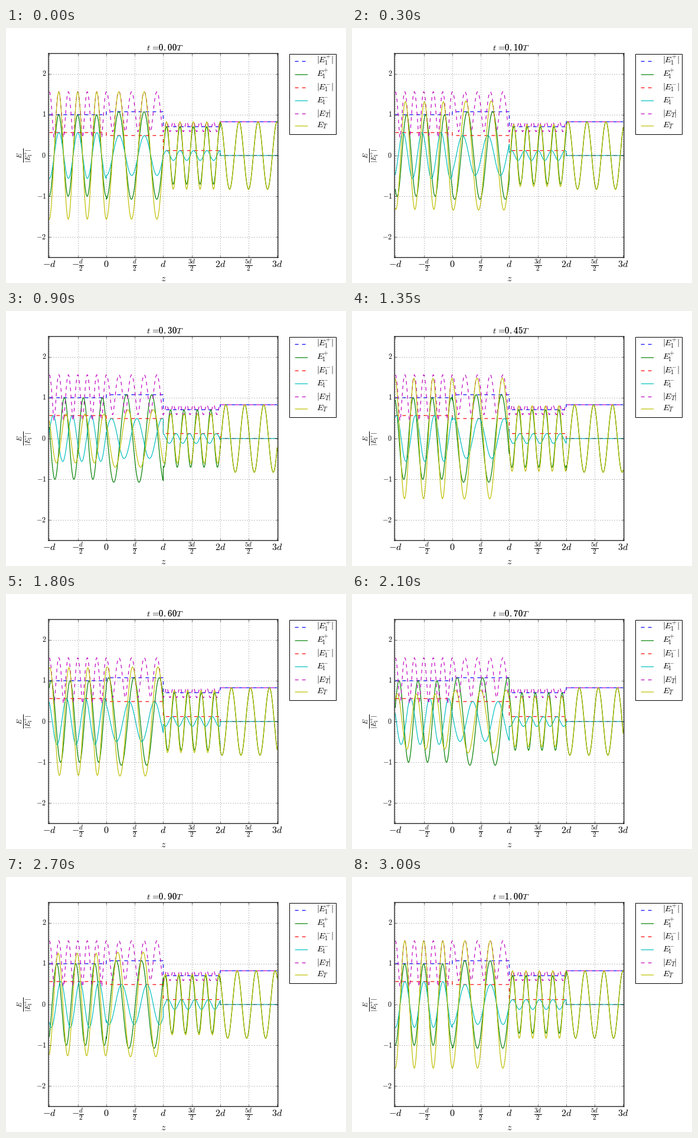
Recreate the animation shown at these times as a matplotlib script. Size 576 by 432 pixels, loop 3.15 s.

```python
import numpy as np
import matplotlib.pyplot as plt
from matplotlib.animation import FuncAnimation

W, H, DPI = 576, 432, 72
STEPS = 21
LAG = 0.006  # constant phase lag, in periods
TAU = 2 * np.pi

plt.rcParams.update({
    "mathtext.fontset": "cm",
    "lines.scale_dashes": False,
    "axes.linewidth": 1.2,
})

# Wave numbers per layer (in cycles per d); d = 1
K0, K1, K2 = 3, 2.25, 4.25


def amplitudes():
    """Solve the boundary conditions back from the last layer, |E1+| = 1."""
    r = (K2 - K0) / (K2 + K0)
    p2, m2 = 1 / (1 + r), r / (1 + r)
    total, diff = K2 / K1, p2 - m2
    p1, m1 = (total + diff) / 2, (total - diff) / 2
    diff *= K1 / K0
    p0, m0 = (total + diff) / 2, (total - diff) / 2
    return np.array([p0, p1, p2, 1]) / p0, np.array([m0, m1, m2, 0]) / p0


PLUS, MINUS = amplitudes()
N = 400
u = np.linspace(0, 1, N)
z = np.concatenate([u + i - 1 for i in range(4)])
phase = TAU * np.concatenate([K0 * u, K1 * u, K2 * u - K2, K0 * u])
sign = np.repeat([-1, -1, 1, 1], N)
amp_p = np.repeat(PLUS, N)
amp_m = np.repeat(MINUS, N)
fwd = sign * amp_p * np.exp(1j * phase)
back = sign * amp_m * np.exp(-1j * phase)

fig = plt.figure(figsize=(W / DPI, H / DPI), dpi=DPI, facecolor="white")
ax = fig.add_axes([0.125, 0.1, 0.675, 0.8])
ax.set_xlim(-1.0145, 3.0145)
ax.set_ylim(-2.5, 2.5)
ax.set_axisbelow(False)
ax.set_xticks(np.arange(-1, 3.1, 0.5))
ax.set_yticks(range(-2, 3))
ax.tick_params(direction="in", length=4, width=0.5, top=True, right=True,
               labelbottom=False, labelleft=False)
ax.grid(True, color="k", linewidth=0.5, linestyle=(0, (1, 3)))
for spine in ax.spines.values():
    spine.set_snap(False)

# Page layer in pixel units, y downwards
page = fig.add_axes([0, 0, 1, 1])
page.set_xlim(0, W)
page.set_ylim(H, 0)
page.axis("off")


def label(x, y, tex, size, ha="center", **kw):
    return page.text(x, y, f"${tex}$", fontsize=size, ha=ha,
                     va=kw.pop("va", "baseline"), **kw)


def field(sup):
    return rf"E\hspace{{-0.1}}_1^{sup}"


def modulus(tex):
    return rf"|{tex}\hspace{{-0.13}}|"


XTICKS = ["-d", r"-\frac{d}{2}", "0", r"\frac{d}{2}", "d",
          r"\frac{3d}{2}", "2d", r"\frac{5d}{2}", "3d"]
for i, tex in enumerate(XTICKS):
    label(73.2 + 48.25 * i, 405, tex, 16)
for v in range(-2, 3):
    label(68, 216 - 69.12 * v, str(v), 12, ha="right", va="center")
label(266.4, 429, "z", 16)
label(32.5, 216, rf"\frac{{E}}{{{modulus(field('+'))}}}", 16,
      va="center", rotation=90)

# Title: the bold number is struck twice to thicken it
label(238, 38, r"t\,=", 14.4, ha="left")
digits = [label(x, 38, "0", 14.4, ha="left") for x in (257.6, 258.2)]
label(287.5, 38, "T", 14.4, ha="left")

STYLES = [
    ("#0000ff", True, modulus(field("+")), 56.5),
    ("#008000", False, field("+"), 79),
    ("#ff0000", True, modulus(field("-")), 101.3),
    ("#00bfbf", False, field("-"), 123.3),
    ("#bf00bf", True, modulus("E_T"), 145.5),
    ("#bfbf00", False, "E_T", 166),
]

page.add_patch(plt.Rectangle((480, 43.6), 79, 136, fc="white", ec="k", lw=1))
lines = []
for color, dashed, tex, y in STYLES:
    style = dict(color=color, lw=1.2, ls=(0, (6, 6)) if dashed else "-")
    lines.append(ax.plot([], [], **style)[0])
    page.plot([489.6, 511.2], [y, y], solid_capstyle="butt", snap=False, **style)
    label(526, y + 3, tex, 14.4, ha="left")


def draw(i):
    t = i / (STEPS - 1)
    turn = np.exp(1j * TAU * (t - LAG))
    ep = (fwd / turn).real
    em = (back / turn).real
    curves = [amp_p, ep, amp_m, em, abs(fwd + back), ep + em]
    for line, values in zip(lines, curves):
        line.set_data(z, values)
    number = r"\hspace{0.08}".join(rf"\mathbf{{{c}}}" for c in f"{t:.2f}")
    for text in digits:
        text.set_text(f"${number}$")
    return lines + digits


anim = FuncAnimation(fig, draw, frames=STEPS, interval=150, repeat=True,
                     repeat_delay=0, blit=False)
plt.show()
```
